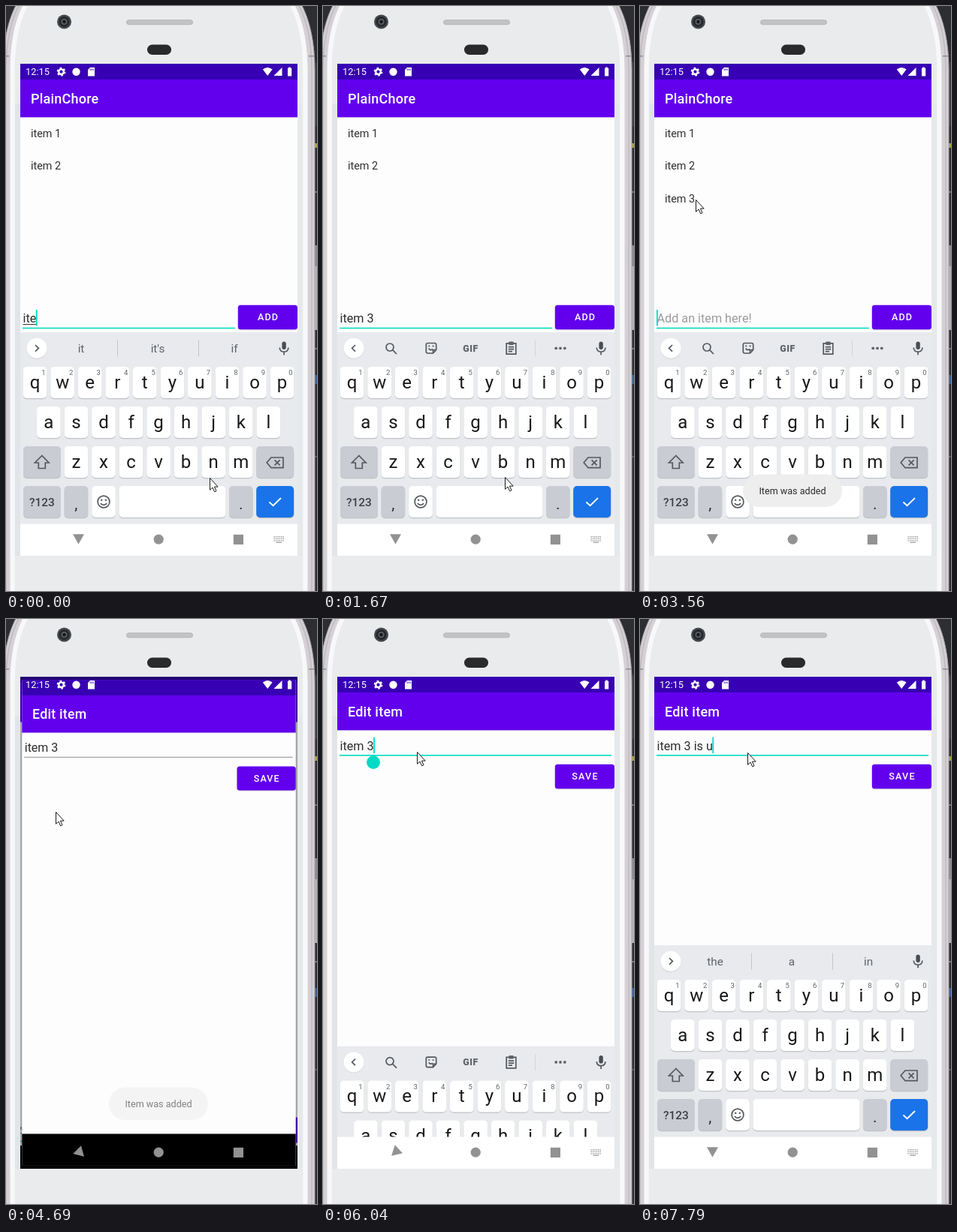
These frames come from a looping animation (414 px wide and 780 px high, 8000 ms). An HTML page:

```html
<!DOCTYPE html>
<html lang="en">
<head>
<meta charset="utf-8">
<title>To-do demo</title>
<style>
html, body { margin: 0; width: 100%; height: 100%; overflow: hidden; background: #2c2e31; }
svg { display: block; width: 414px; height: 780px; }
text { font-family: Roboto, "Noto Sans", sans-serif; white-space: pre; }
.mid { text-anchor: middle; }
.med { font-weight: 500; }
.line { fill: none; stroke: #55595e; stroke-width: 1.7; }
</style>
</head>
<body>
<svg id="stage" viewBox="0 0 414 780" xmlns="http://www.w3.org/2000/svg"></svg>
<script>
const LOOP = 8000, CX = 203.5, CY = 405;
const TEAL = '#03dac5', PURPLE = '#6200ee', GREY = '#5f6368';

// ---- drawing helpers ----
const rect = (x, y, w, h, fill, r = 0, more = '') =>
  `<rect x="${x}" y="${y}" width="${w}" height="${h}" rx="${r}" fill="${fill}" ${more}/>`;
const disc = (x, y, r, fill, more = '') =>
  `<circle cx="${x}" cy="${y}" r="${r}" fill="${fill}" ${more}/>`;
const text = (x, y, size, fill, str, more = '') =>
  `<text x="${x}" y="${y}" font-size="${size}" fill="${fill}" ${more}>${str}</text>`;
const path = (d, fill, more = '') => `<path d="${d}" fill="${fill}" ${more}/>`;
const line = (d, more = '') => `<path class="line" d="${d}" ${more}/>`;
const group = (id, inner, more = '') => `<g id="${id}" ${more}>${inner}</g>`;

function bodyPath(half) {
  const l = CX - half, r = CX + half;
  return `M${l} 790V85C${l} 50 ${l + 6} 18 ${l + 20} -6H${r - 20}C${r - 6} 18 ${r} 50 ${r} 85V790Z`;
}

function phone() {
  let s = rect(0, 0, 414, 780, '#2c2e31');
  for (const [y, h, c] of [[75, 85, '#3c3f41'], [183, 6, '#a8a04a'], [247, 2, '#77797b'],
    [319, 28, '#8b8d8f'], [347, 85, '#b4b5b7'], [456, 2, '#77797b'], [492, 12, '#3d5f96'], [600, 2, '#55585b']])
    s += rect(410, y, 4, h, c);
  s += path(bodyPath(207.5), '#d5d0d4', 'stroke="#a5a1a5"');
  s += path(bodyPath(203.5), 'none', 'stroke="#bfbabf" stroke-width="1.5"');
  s += path(bodyPath(198), '#e9ebec') + path(bodyPath(194.8), 'none', 'stroke="#f8f8f9" stroke-width="6"');
  s += rect(0, 66, 4, 1.5, '#8f8c90') + rect(403, 66, 8, 1.5, '#8f8c90');
  s += rect(12, 130, 7, 603, '#e2e5e7') + rect(388, 130, 7, 603, '#e6e9eb');
  s += disc(77.5, 21, 9.5, '#45484c') + disc(77.5, 21, 7, '#26292c') + disc(77.5, 21, 4, '#5a5e62') + disc(77.5, 21, 2.2, '#15171a');
  s += rect(160.5, 18.7, 88, 6, '#c1c3c5', 3, 'stroke="#acaeb0" stroke-width=".8"');
  s += rect(188, 51.5, 32, 13.5, '#2a2a2d', 6.7);
  return s;
}

// status strip, app bar, page and dark navigation strip
function windowBase(title) {
  return rect(19, 77, 369, 656, '#fdfdfd') + rect(19, 77, 369, 21.3, '#3700b3') +
    rect(19, 98, 369, 50.3, PURPLE) + rect(19, 148.3, 369, 1, '#000', 0, 'opacity=".1"') +
    rect(19, 690, 369, 43, '#000') + text(33, 130, 18, '#fff', title, 'class="med" letter-spacing=".22"');
}

const button = (y, label) =>
  rect(308.8, y + .8, 79.2, 32.4, '#000', 3.6, 'opacity=".16"') + rect(308.8, y - .2, 79.2, 32.5, PURPLE, 3.6) +
  text(349, y + 20.4, 12.6, '#fff', label, 'class="mid med" letter-spacing="1.125"');

const field = (id, y) =>
  group(id, text(22.5, y, 16.2, '#2b2b2b', '') +
    rect(22, y + 2, 0, 1, '#333') + rect(22, y - 17, 1.8, 21.5, TEAL));

function statusIcons() {
  let s = text(26, 92.4, 12.8, '#fff', '12:15');
  s += disc(73.5, 87.7, 3.3, 'none', 'stroke="#fff" stroke-width="2.4"') +
    disc(73.5, 87.7, 4.9, 'none', 'stroke="#fff" stroke-width="2" stroke-dasharray="2.6 2.53"');
  s += disc(93.5, 87.7, 5.2, '#fff');
  s += path('M112 82H118V93.5H109V85Z', '#fff') + path('M112.2 83.5v2.4M114.2 83.5v2.4M116.2 83.5v2.4', 'none', 'stroke="#3700b3" stroke-width=".9"');
  s += path('M341.8 84.6Q348.2 79.4 354.6 84.6L348.2 93Z', '#fff');
  s += path('M367.5 82V93H356.5Z', '#fff') + path('M375 82.8h1.3v-1.2h2.4v1.2h1.5v10.6h-5.2Z', '#fff');
  return s;
}

// ---- keyboard ----
const STEP = 36.55;
const key = (x, y, w, fill = '#fff') =>
  rect(x, y + 1.2, w, 42, '#bfc2c6', 5) + rect(x, y, w, 42, fill, 5);

function letters(row, x, y) {
  return [...row].map((c, i) => {
    const cx = x + i * STEP;
    return key(cx - 15.8, y, 31.6) + text(cx, y + 28.6, 24, '#17181a', c, 'class="mid"');
  }).join('');
}

function keys() {
  const dark = '#c9ccd3';
  let s = rect(19, 435, 369, 256, '#e8eaed');
  s += letters('qwertyuiop', 38.6, 481) + letters('asdfghjkl', 56.9, 534) + letters('zxcvbnm', 93.4, 587);
  for (let i = 0; i < 10; i++) s += text(50 + i * STEP, 492, 9.5, GREY, (i + 1) % 10, 'class="mid"');
  s += key(23, 587, 50, dark) + key(333.2, 587, 50, dark) + key(23, 640, 50, dark) + key(77.6, 640, 31.6, dark);
  s += key(114.2, 640, 31.6) + key(150.5, 640, 142) + key(297, 640, 31.6, dark) + key(333.2, 640, 50, '#1a73e8');
  s += line('M47.8 599.5L38.5 609H43.3V616.5H52.3V609H57.1Z');
  s += line('M353 602H369V615.7H353L347.2 608.8ZM357.6 605.4L364.6 612.4M364.6 605.4L357.6 612.4');
  s += text(47.8, 667, 15.4, '#3c4043', '?123', 'class="mid med"');
  s += text(93.4, 671, 21, '#2d2f31', ',', 'class="mid"') + text(312.8, 671, 21, '#2d2f31', '.', 'class="mid"');
  s += disc(130, 661, 7.9, 'none', 'class="line"') + disc(127.2, 658.8, 1.3, GREY) + disc(132.8, 658.8, 1.3, GREY) + line('M125.8 663.2Q130 667.6 134.2 663.2');
  s += path('M350.4 661.4L355.6 666.2L366 656', 'none', 'stroke="#fff" stroke-width="1.9"');
  s += disc(41, 457.2, 13.5, '#cfd2d6') + disc(41, 456.3, 13.5, '#fff') + line('', 'id="chevron"');
  s += rect(367.4, 447.5, 5.4, 10.5, '#4a4d51', 2.7) + line('M364.3 455.5Q364.5 461 370.1 461T375.9 455.5M370.1 461V465.3');
  s += group('words', rect(148, 445.5, 1, 22, '#c3c6ca') + rect(256, 445.5, 1, 22, '#c3c6ca') +
    [100, 202, 304].map(x => text(x, 462, 15.3, GREY, '', 'class="mid"')).join(''));
  s += group('tools', toolIcons());
  return s;
}

function toolIcons() {
  let s = disc(89, 455, 5, 'none', 'class="line"') + line('M92.7 458.7L98 464');
  s += line('M139.5 449.5H148.5Q150.7 449.5 150.7 451.7V458.5L146.5 463H139.5Q137.3 463 137.3 460.8V451.7Q137.3 449.5 139.5 449.5ZM146.5 462.5V458.7H150.5M140.7 456.5Q142.8 460 146 457.5');
  s += disc(141.2, 453.4, 1.1, GREY) + disc(146.6, 453.4, 1.1, GREY);
  s += text(196.6, 460.6, 12.4, GREY, 'GIF', 'class="mid" font-weight="900" letter-spacing=".6"');
  s += line('M244.2 449.8H256.8V464.2H244.2ZM246.8 454.6H254.2M246.8 457.6H254.2M246.8 460.6H252') + rect(247.3, 447.5, 6.4, 4.4, GREY, 1);
  s += rect(282, 445.5, 1, 22, '#d3d6d9');
  for (const x of [310.2, 316, 321.8]) s += disc(x, 456.3, 1.9, GREY);
  return s;
}

function navLight() {
  let s = rect(19, 690.5, 369, 42.5, '#fff');
  for (let i = 0; i < 18; i++) s += rect(356.5 + i % 6 * 2.4, 707 + Math.floor(i / 6) * 2.6, 1.4, 1.4, '#999');
  return s + rect(359.5, 714.6, 7.5, 1.2, '#999');
}

document.getElementById('stage').innerHTML =
  `<clipPath id="screen"><rect x="19" y="77" width="369" height="656"/></clipPath>` + phone() +
  group('view',
    group('main', windowBase('PlainChore') +
      [1, 2, 3].map(n => text(33, 132.2 + n * 43.1, 14.4, '#2f2f2f', 'item ' + n, `id="item${n}"`)).join('') +
      group('entry', rect(22, 428.7, 283, 1.6, TEAL) +
        text(22.5, 422, 16.2, '#9b9b9b', 'Add an item here!', 'id="hint"') + field('add', 422) +
        button(399, 'ADD') + rect(308.8, 398.8, 79.2, 32.5, '#fff', 3.6, 'id="press" opacity="0"'))) +
    rect(19, 77, 369, 656, '#000', 0, 'id="scrim"') +
    group('edit', windowBase('Edit item') + rect(22, 181, 362, 1, '#8c8c8c', 0, 'id="rule"') +
      field('name', 174.6) + button(194, 'SAVE') +
      path('M67 180.5L73 184.4A9 9 0 1 1 61 184.4Z', TEAL, 'id="handle"')) +
    group('keys', keys()) + group('navLight', navLight()) +
    path('M89 704.2H104L96.5 717.4Z', '#929292', 'id="back"') + disc(203.2, 711.2, 6.6, '#929292') + rect(302.8, 704.8, 13.2, 13.2, '#929292') +
    statusIcons(), 'clip-path="url(#screen)"') +
  group('toast', rect(137, 624.5, 132, 43.5, '#eee', 21.7) + text(203, 651, 12.6, '#2c2c2c', 'Item was added', 'class="mid"')) +
  path('M-.5 .5V16.3L3 13L5.6 18.8L8 17.7L5.4 12.1H10.2Z', '#fff', 'id="mouse" stroke="#1a1a1a" stroke-linejoin="round"');

// ---- timeline ----
const $ = id => document.getElementById(id);
const clamp = v => Math.max(0, Math.min(1, v));
const ramp = (t, a, b) => clamp((t - a) / (b - a));
const smooth = u => u * u * (3 - 2 * u);
const show = (id, v) => $(id).setAttribute('opacity', +v);
const move = (id, v) => $(id).setAttribute('transform', v);
const zoom = k => `translate(${CX} ${CY}) scale(${k}) translate(${-CX} ${-CY})`;
const latest = (list, t) => list.reduce((a, b) => b[0] <= t ? b : a);

const TICKS = [0, 120, 390, 540, 690, 970, 1120, 1270, 1390, 1670, 1790, 1940, 2060, 2210, 2360, 2480, 2630,
  2780, 2900, 3050, 3170, 3290, 3440, 3560, 4020, 4170, 4540, 4690, 4810, 4960, 5110, 5230, 5380, 5530,
  5650, 5770, 5920, 6070, 6190, 6310, 6460, 6580, 6850, 6970, 7120, 7240, 7360, 7790];

// time, text, composing start
const ADD_TEXT = [[-100, 'ite', 0], [120, 'item', 0], [390, 'item '], [970, 'item 3'], [2480, '']];
const NAME_TEXT = [[5770, 'item 3'], [6460, 'item 3 '], [6850, 'item 3 i', 7], [6970, 'item 3 is', 7],
  [7240, 'item 3 is '], [7790, 'item 3 is u']];
const WORDS = [[0, 'it', "it's", 'if'], [120, 'item', 'items', 'it'], [540, 'is', 'in', 'number'], [1120],
  [6580, 'is', 'and', 'in'], [6850, 'is', 'in', 'it'], [6970, 'is', "isn't", 'I'], [7360, 'the', 'a', 'in']];
const MOUSE = [[0, 272, 629], [1400, 272, 629], [1670, 243, 628], [2210, 346, 412], [2780, 346, 412],
  [3560, 75, 258], [4020, 75, 258], [4170, 67, 257], [4690, 67, 257], [5380, 108, 183],
  [5530, 108, 183], [6190, 136, 174], [6460, 136, 174], [6580, 144, 178], [8000, 144, 178]];

function setField(id, list, t, focused) {
  const [since, str, from] = latest(list, t);
  const [label, under, caret] = $(id).children;
  label.textContent = str;
  const end = str ? label.getComputedTextLength() : 0;
  const start = from ? label.getSubStringLength(0, from) : 0;
  under.setAttribute('x', 22.5 + start);
  under.setAttribute('width', from === undefined ? 0 : end - start);
  caret.setAttribute('x', 22 + end);
  caret.setAttribute('opacity', +(focused && (t - since) % 1000 < 500));
}

function draw(now) {
  const time = now % LOOP;
  const t = TICKS.reduce((a, b) => b <= time ? b : a);

  // main page
  const opening = t >= 4540;
  setField('add', ADD_TEXT, t, !opening);
  show('hint', t >= 2480);
  show('item3', t >= 2480);
  show('press', t < 2300 ? 0 : .28 * (1 - ramp(t, 2360, 2780)));
  move('entry', `translate(0 ${opening ? 255 : 0})`);

  // page change
  const rest = (1 - ramp(t, 4540, 4940)) ** 5;
  move('main', zoom(opening ? 1 + .047 * (1 - rest) : 1));
  move('edit', zoom(1 - .13 * rest));
  show('edit', opening ? ramp(t, 4490, 4600) : 0);
  show('scrim', .35 * ramp(t, 4540, 4690));

  // edit page
  const focused = t >= 5770;
  setField('name', NAME_TEXT, t, focused);
  const rule = $('rule');
  rule.setAttribute('fill', focused ? TEAL : '#8c8c8c');
  rule.setAttribute('height', focused ? 1.6 : 1);
  show('handle', t >= 5770 && t < 6460);

  // keyboard
  const up = opening ? smooth(ramp(t, 5780, 6070)) : 1;
  move('keys', `translate(0 ${256 * (1 - up)})`);
  show('keys', up > 0);
  show('navLight', up > 0);
  const turn = opening ? (t < 5700 ? 90 * (1 - rest * 1.8) : 90 * (1 - up)) : 0;
  move('back', `rotate(${Math.max(0, turn)} 95.8 710.4)`);
  const words = latest(WORDS, t).slice(1), some = words.length > 0;
  show('words', some);
  show('tools', !some);
  $('words').querySelectorAll('text').forEach((el, i) => el.textContent = words[i] || '');
  $('chevron').setAttribute('d', some ? 'M39 452L43.4 456.3L39 460.6' : 'M43 452L38.6 456.3L43 460.6');

  show('toast', ramp(t, 2700, 3000) * (1 - ramp(t, 4540, 4900)));

  const i = MOUSE.findIndex(m => m[0] > t), [a, b] = [MOUSE[i - 1], MOUSE[i]];
  const u = smooth(ramp(t, a[0], b[0]));
  move('mouse', `translate(${Math.round(a[1] + (b[1] - a[1]) * u)} ${Math.round(a[2] + (b[2] - a[2]) * u)})`);
}

const begin = performance.now();
function loop() {
  draw(performance.now() - begin);
  requestAnimationFrame(loop);
}
loop();
</script>
</body>
</html>
```
